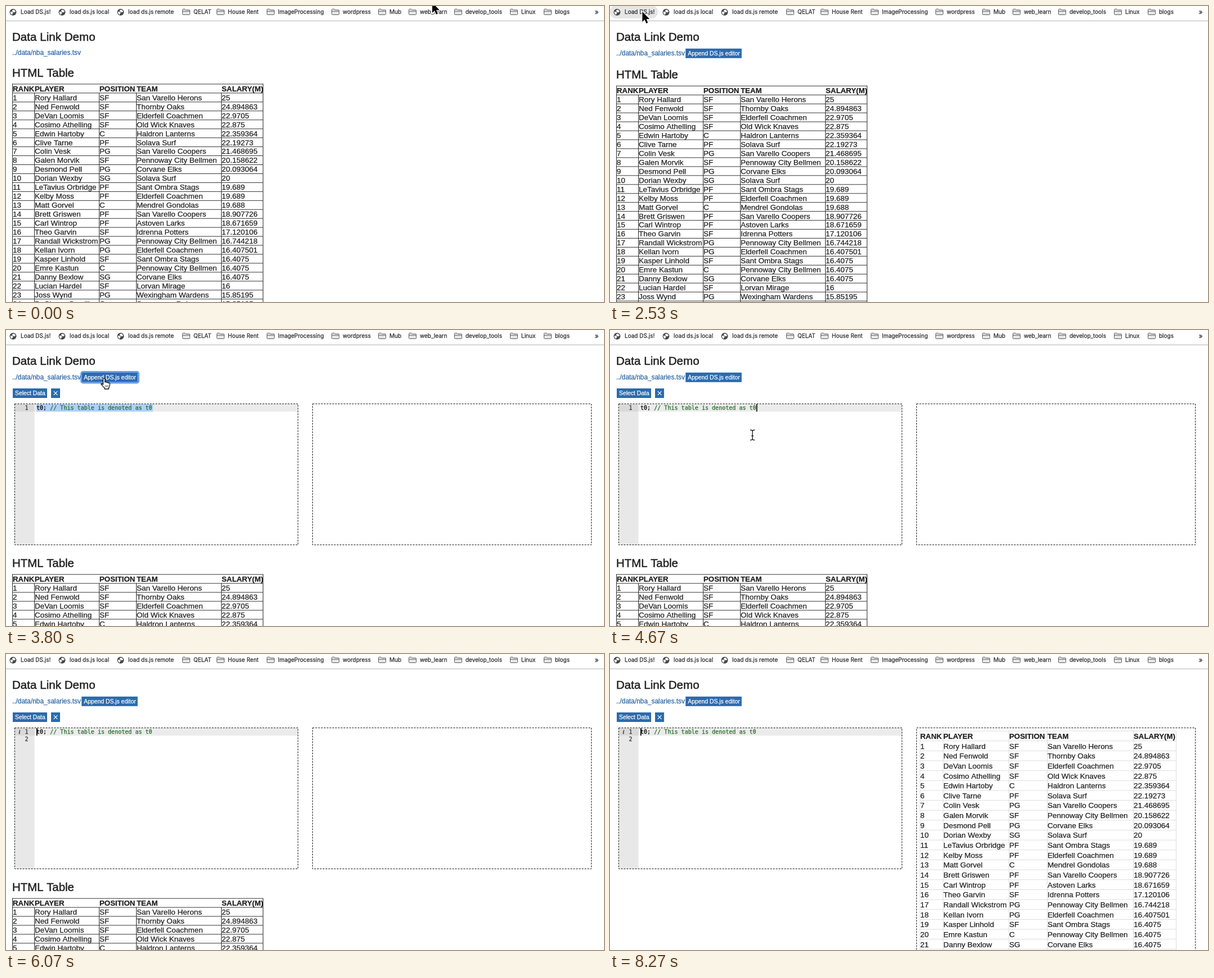
An HTML page with a canvas that plays this animation: 1062 px wide and 527 px high, repeating every 8.34 s.

```html
<!DOCTYPE html>
<html lang="en">
<head>
<meta charset="utf-8">
<title>Data Link Demo</title>
<style>
html, body { margin: 0; width: 100%; height: 100%; overflow: hidden; background: #fff; }
canvas { display: block; }
</style>
</head>
<body>
<canvas id="stage" width="1062" height="527"></canvas>
<script>
const W = 1062, H = 527, LOOP = 8340, FPS = 15;
const ctx = document.getElementById('stage').getContext('2d');

const SANS = '"Liberation Sans", Arial, sans-serif';
const UI = 'Inter, Roboto, sans-serif';
const MONO = '"DejaVu Sans Mono", monospace';
const INK = '#222', BLUE = '#2a6bb0';

// Moments of the story, in ms
const PRESS = 2330, LOADED = 2530, APPEND = 3470, FOCUS = 4470,
  ENTER = 5270, UP = 5600, LINT = 5860, RUN = 6060, RESULT = 6330;

const HEAD = ['RANK', 'PLAYER', 'POSITION', 'TEAM', 'SALARY(M)'];
const ROWS = `Rory Hallard|SF|San Varello Herons|25
Ned Fenwold|SF|Thornby Oaks|24.894863
DeVan Loomis|SF|Elderfell Coachmen|22.9705
Cosimo Athelling|SF|Old Wick Knaves|22.875
Edwin Hartoby|C|Haldron Lanterns|22.359364
Clive Tarne|PF|Solava Surf|22.19273
Colin Vesk|PG|San Varello Coopers|21.468695
Galen Morvik|SF|Pennoway City Bellmen|20.158622
Desmond Pell|PG|Corvane Elks|20.093064
Dorian Wexby|SG|Solava Surf|20
LeTavius Orbridge|PF|Sant Ombra Stags|19.689
Kelby Moss|PF|Elderfell Coachmen|19.689
Matt Gorvel|C|Mendrel Gondolas|19.688
Brett Griswen|PF|San Varello Coopers|18.907726
Carl Wintrop|PF|Astoven Larks|18.671659
Theo Garvin|SF|Idrenna Potters|17.120106
Randall Wickstrom|PG|Pennoway City Bellmen|16.744218
Kellan Ivorn|PG|Elderfell Coachmen|16.407501
Kasper Linhold|SF|Sant Ombra Stags|16.4075
Emre Kastun|C|Pennoway City Bellmen|16.4075
Danny Bexlow|SG|Corvane Elks|16.4075
Lucian Hardel|SF|Lorvan Mirage|16
Joss Wynd|PG|Wexingham Wardens|15.85195
DuShane Corvill|C|Serrameno Dukes|15.85195`
  .split('\n').map((line, i) => [String(i + 1), ...line.split('|')]);

const BOOKMARKS = [
  ['Load DS.js!', 26], ['load ds.js local', 113], ['load ds.js remote', 217],
  ['QELAT', 333], ['House Rent', 394], ['ImageProcessing', 483], ['wordpress', 598],
  ['Mub', 681], ['web_learn', 735], ['develop_tools', 816], ['Linux', 915], ['blogs', 975]
];

// Pointer path: time, x, y
const PATH = [
  [0, 757, -6], [70, 757, -6], [200, 745, -28], [1000, 62, -28], [1330, 57.4, 16],
  [1870, 57.4, 16], [2200, 57.4, 10], [2600, 57.4, 10], [3200, 173, 86],
  [3870, 173, 86], [4330, 253, 187]
];
const ARROW = new Path2D('M0 0V18.2L4.2 14.2 7 20.9 9.9 19.7 7.2 13.2H12.9Z');
const HAND = new Path2D('M4.5 12V2.5a1.6 1.6 0 0 1 3.2 0V8q2.8-1.4 3.2.6 2.6-1 3 .9 2.6-.8 2.6 1.6 0 4.5-2 6.9V20H7v-1.8Q4 15 1 11.6q-.6-2.4 3.5.4Z');
const BEAM = new Path2D('M-4-9Q0-9 0-6.5 0-9 4-9M0-7V7M-4 9Q0 9 0 6.5 0 9 4 9M-2 1.5H2');

// The thin stroke gives the slightly heavy look of smoothed screen type
function text(str, x, y, size, color = INK, family = SANS, style = '', weight = 0.25) {
  ctx.font = `${style} ${size}px ${family}`;
  ctx.fillStyle = ctx.strokeStyle = color;
  ctx.lineWidth = weight;
  ctx.fillText(str, x, y);
  ctx.strokeText(str, x, y);
}

const heading = (str, y, size) => text(str, 11, y, size, INK, SANS, '', 0.5);

function rect(x, y, w, h, color) {
  ctx.fillStyle = color;
  ctx.fillRect(x, y, w, h);
}

function round(x, y, w, h, r) {
  ctx.beginPath();
  ctx.roundRect(x, y, w, h, r);
}

function outline(path, color, width) {
  ctx.strokeStyle = color;
  ctx.lineWidth = width;
  path ? ctx.stroke(path) : ctx.stroke();
}

function globe(x, y) {
  ctx.beginPath();
  ctx.arc(x, y, 6, 0, 7);
  ctx.fillStyle = '#484848';
  ctx.fill();
  ctx.fillStyle = '#fff';
  ctx.fill(new Path2D(`M${x - 4.6} ${y - 1}l3.4.6 1.6 2-1.6 1 -.4 2.2q-3.4-1.6-3-5.8Z`));
  ctx.fill(new Path2D(`M${x} ${y - 4.6}q3.6.4 4.5 3.6l-2.2 1.4-2.6-1.2-1.7-1.4Z`));
}

function folder(x) {
  const shape = new Path2D(`M${x + .5} 14.5V6.5q0-1 1-1h3.6l1.4 1.5h6q1 0 1 1v6.5q0 1-1 1h-11q-1 0-1-1Z`);
  ctx.fillStyle = '#e6e6e6';
  ctx.fill(shape);
  outline(shape, '#5a5a5a', 1);
  rect(x + 1, 8.8, 12, 1, '#5a5a5a');
}

function bookmarks(t) {
  const tip = pointer(t);
  if (t > 1070 && t < 2800 && tip[1] > 0 && tip[1] < 22) {
    round(0, -1, 85, 23, 11);
    ctx.fillStyle = t >= PRESS ? '#e6e6e6' : '#f4f4f4';
    ctx.fill();
  }
  BOOKMARKS.forEach(([label, x], i) => {
    i < 3 ? globe(x - 13.5, 11) : folder(x - 20);
    text(label, x, 14.3, 10, '#2c2c2c', UI);
  });
  text('»', 1045.5, 14.5, 12, '#2c2c2c', UI);
  rect(0, 26, W, 1, '#b4b4b4');
}

// edges: column borders; pitch: row height; gap: border to header baseline;
// headTop: where the inner column borders start
function table(edges, top, pitch, gap, headTop, color) {
  const left = edges[0], right = edges[5];
  for (let y = top; y < H; y += pitch) rect(left, y, right - left + 1, 0.95, color);
  edges.forEach(x => {
    const y = x === left || x === right ? top : headTop;
    rect(x, y, 1, H - y, color);
  });
  [HEAD, ...ROWS].forEach((row, r) => {
    const y = top + gap + r * pitch;
    if (y > H + 14) return;
    row.forEach((cell, c) =>
      text(cell, edges[c] + 1, y, r ? 13.5 : 13.25, INK, SANS, r ? '' : 'bold'));
  });
}

function button(label, x, y, w, h) {
  rect(x, y, w, h, BLUE);
  text(label, x + 4, y + h / 2 + 3.6, 10.4, '#fff');
}

function dashed(x, y, w, h) {
  ctx.setLineDash([3, 2]);
  ctx.beginPath();
  ctx.rect(x + .5, y + .5, w, h);
  outline(null, '#111', 1);
  ctx.setLineDash([]);
}

function caretOn(t) {
  const since = [RUN, UP, ENTER, FOCUS].find(k => t >= k);
  return since !== undefined && (t - since) % 1000 < 600;
}

function editor(t) {
  const row = t >= ENTER && t < UP ? 1 : 0;
  const top = 132 + row * 13.3;
  rect(16, 132, 34.5, 250, '#e8e8e8');
  rect(16, top, 34.5, 13.3, '#d9d9d9');
  rect(50.5, top, 468, 13.3, '#ebebeb');
  if (t < FOCUS) rect(54, 132, 207, 13.3, '#afd0f8');

  text('1', 33.5, 142, 10.05, '#333', MONO);
  if (t >= ENTER) text('2', 33.5, 155.3, 10.05, '#333', MONO);
  if (t >= LINT) text('i', 22.5, 142, 10.5, '#444', '"Liberation Serif", serif', 'italic bold');
  text('t0;', 54, 142, 10.05, '#000', MONO);
  text('// This table is denoted as t0', 78.2, 142, 10.05, '#236e24', MONO);

  if (caretOn(t)) rect(t < ENTER ? 259.8 : 54, top, 1.7, 13.3, '#000');
  dashed(15, 131, 503, 251);
  dashed(544, 131, 495, t >= RESULT ? 500 : 251);
}

function page(t) {
  const loaded = t >= LOADED, open = t >= APPEND;
  const shift = open ? 296.2 : loaded ? 3.4 : 0;
  heading('Data Link Demo', 62, 20.6);
  text('../data/nba_salaries.tsv', 11, loaded ? 87.6 : 86.6, 11.85, '#2a66a6');

  if (loaded) button('Append DS.js editor', 134.2, 75.8, 99.6, 17);
  if (open && t < FOCUS) {
    round(133.5, 74.5, 102, 19.5, 3);
    outline(null, '#6a9fe8', 2.8);
  }
  if (open) {
    button('Select Data', 12, 104, 61, 17);
    button('', 80, 104, 16, 17);
    outline(new Path2D('M84.8 109.2l6.6 6.6m0-6.6l-6.6 6.6'), '#fff', 1.2);
    editor(t);
  }
  if (t >= RESULT) {
    table([550, 591, 708, 776, 929, 1005], 136.6, 17.65, 14.3, 136.6, '#dcdcdc');
  } else {
    const top = 138.5 + shift;
    heading('HTML Table', 126 + shift, 20.4);
    table([11, 50, 165, 231, 382, 456], top, 15.95, 13.3, top + 15.95, '#2b2b2b');
  }
}

function pointer(t) {
  const i = PATH.findIndex(k => k[0] > t);
  if (i < 0) return PATH[PATH.length - 1].slice(1);
  const [t0, x0, y0] = PATH[i - 1], [t1, x1, y1] = PATH[i];
  const u = (t - t0) / (t1 - t0), e = u * u * (3 - 2 * u);
  return [x0 + (x1 - x0) * e, y0 + (y1 - y0) * e];
}

function drawPointer(t) {
  if (t >= ENTER) return;
  const [x, y] = pointer(t);
  const onButton = t >= LOADED && x > 134 && x < 234 && y > 76 && y < 93;
  ctx.save();
  ctx.lineJoin = 'round';
  if (t >= APPEND && y > 131) {
    ctx.translate(x, y);
    outline(BEAM, '#fff', 3);
    outline(BEAM, '#222', 1.4);
  } else if (onButton) {
    ctx.translate(x - 5, y - 1);
    ctx.fillStyle = '#fff';
    ctx.fill(HAND);
    outline(HAND, '#111', 1.3);
    outline(new Path2D('M8.3 13v4m2.4-4v4m2.3-4v4'), '#333', .8);
  } else {
    ctx.translate(x, y);
    outline(ARROW, '#fff', 2.2);
    ctx.fillStyle = '#000';
    ctx.fill(ARROW);
  }
  ctx.restore();
}

function draw(t) {
  rect(0, 0, W, H, '#fff');
  bookmarks(t);
  page(t);
  drawPointer(t);
}

const start = performance.now();
function tick() {
  const t = (performance.now() - start) % LOOP;
  draw(Math.floor((t + 4) * FPS / 1000) * 1000 / FPS);
  requestAnimationFrame(tick);
}
tick();
</script>
</body>
</html>
```
